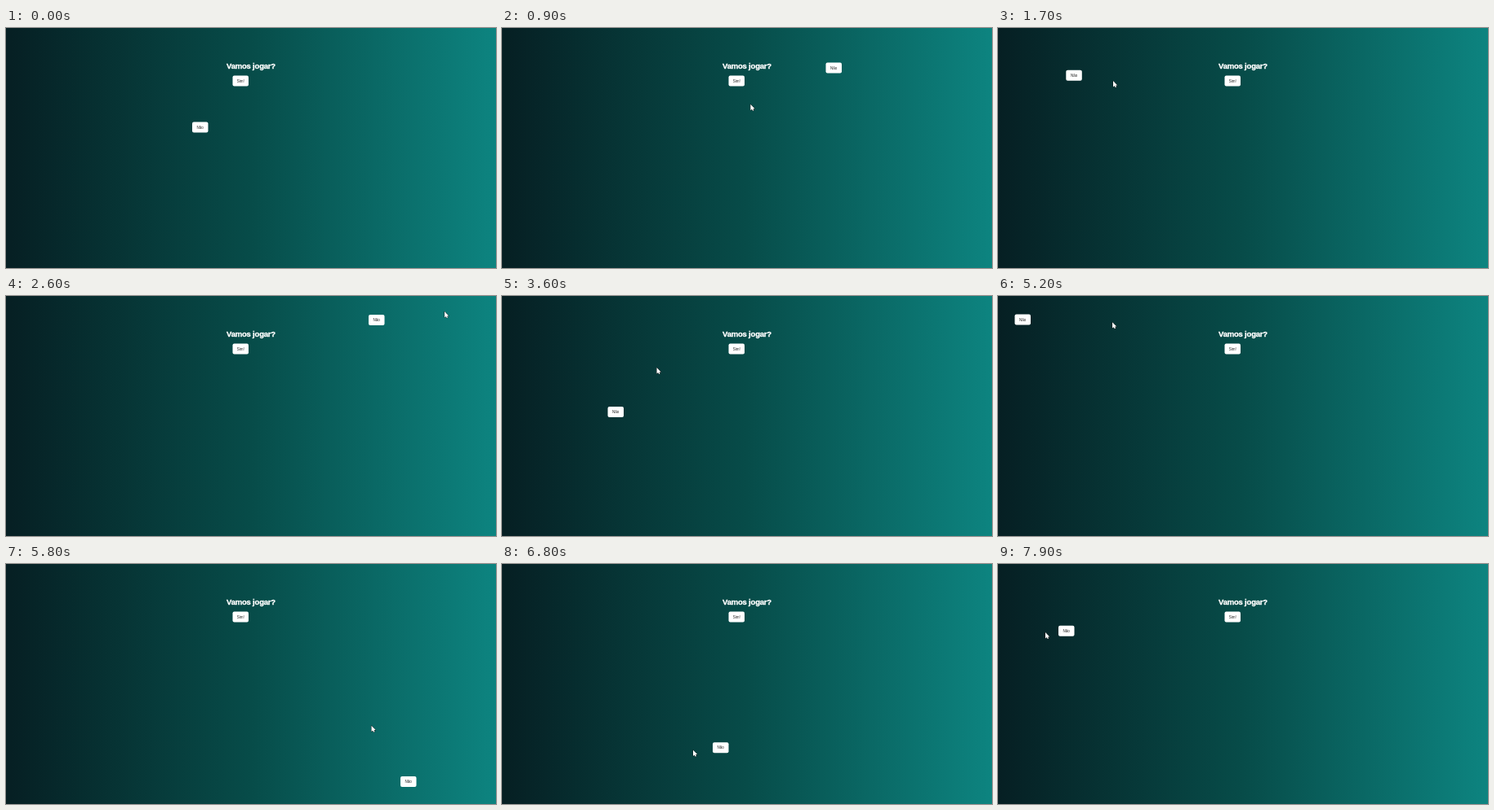
Write an HTML page that moves like this. It is 600x295 px and loops after 8 s.

```html
<!DOCTYPE html>
<html lang="pt">
<head>
<meta charset="utf-8">
<title>Vamos jogar?</title>
<style>
  html, body { margin: 0; width: 100%; height: 100%; overflow: hidden; }
  body { background: linear-gradient(90deg, #061f23, #074c49 50%, #0d8480); }
  svg { display: block; width: 600px; height: 295px; }
  text { font-family: "Liberation Sans", Arial, sans-serif; text-anchor: middle; }
  .title {
    font-size: 9.5px; font-weight: bold; letter-spacing: -0.2px;
    fill: #fff; stroke: #fff; stroke-width: 0.35px;
  }
  .btn rect { fill: #fff; }
  .btn text { font-size: 4.5px; fill: #222; }
  #cursor { fill: #fff; stroke: #111; stroke-width: 0.8px; paint-order: stroke; }
</style>
</head>
<body>
<svg viewBox="0 0 600 295">
  <text class="title" x="300" y="49.5">Vamos jogar?</text>
  <g class="btn" transform="translate(277.5 58.5)">
    <rect width="19.5" height="13" rx="2"/><text x="9.75" y="8.1">Sim!</text>
  </g>
  <g class="btn" id="no">
    <rect width="19.5" height="13" rx="2"/><text x="9.75" y="8.1">Não</text>
  </g>
  <path id="cursor" d="M0 0V7.4L1.7 6 2.7 8 4 7.4 3.1 5.4H5.2Z"/>
</svg>
<script>
  const LOOP = 8000, STEP = 100;

  // [time, x, y]: the button leaps away whenever the pointer touches it
  const leaps = [
    [0, 228, 115.5], [600, 396.5, 42.5], [1300, 83.3, 51.7], [1900, 444, 23],
    [3000, 112.5, 99], [3300, 123.5, 79], [3600, 129.5, 136], [3800, 573, 36],
    [4700, 20.5, 22.5], [5400, 483, 261], [6300, 258, 219.3],
    [7000, 363.5, 115], [7400, 74, 75.7]
  ];

  // Pointer turns between the touches
  const turns = [
    [100, 213, 131], [1700, 141, 65], [2200, 105, 60], [2600, 537, 19],
    [3600, 189.5, 88], [4600, 578.5, 36.5], [5800, 447.5, 198.7],
    [6800, 234, 228.7], [7900, 58, 84]
  ];

  // Each leap starts with a touch on the place the button leaves
  const touches = leaps.slice(1).map(([t], i) => [t, leaps[i][1] + 10, leaps[i][2] + 7]);
  const taken = new Set(turns.map(p => p[0]));
  const path = [...turns, ...touches.filter(p => !taken.has(p[0]))].sort((a, b) => a[0] - b[0]);

  const no = document.getElementById("no");
  const cursor = document.getElementById("cursor");

  const lastRow = (rows, t) => rows.findLastIndex(r => r[0] <= t);
  const ease = k => k * k * (3 - 2 * k);
  const place = (el, x, y) => el.setAttribute("transform", `translate(${x} ${y})`);

  function pointerAt(t) {
    const i = lastRow(path, t);
    const a = path[i], b = path[i + 1] || a;
    const k = b === a ? 0 : ease((t - a[0]) / (b[0] - a[0]));
    return [a[1] + (b[1] - a[1]) * k, a[2] + (b[2] - a[2]) * k];
  }

  function draw(now) {
    const t = Math.floor((now % LOOP) / STEP) * STEP;
    const [, x, y] = leaps[lastRow(leaps, t)];
    place(no, x, y);
    const visible = t >= path[0][0];
    cursor.style.visibility = visible ? "visible" : "hidden";
    if (visible) place(cursor, ...pointerAt(t));
  }

  let start;
  function tick(now) {
    start ??= now;
    draw(now - start);
    requestAnimationFrame(tick);
  }
  draw(0);
  requestAnimationFrame(tick);
</script>
</body>
</html>
```
